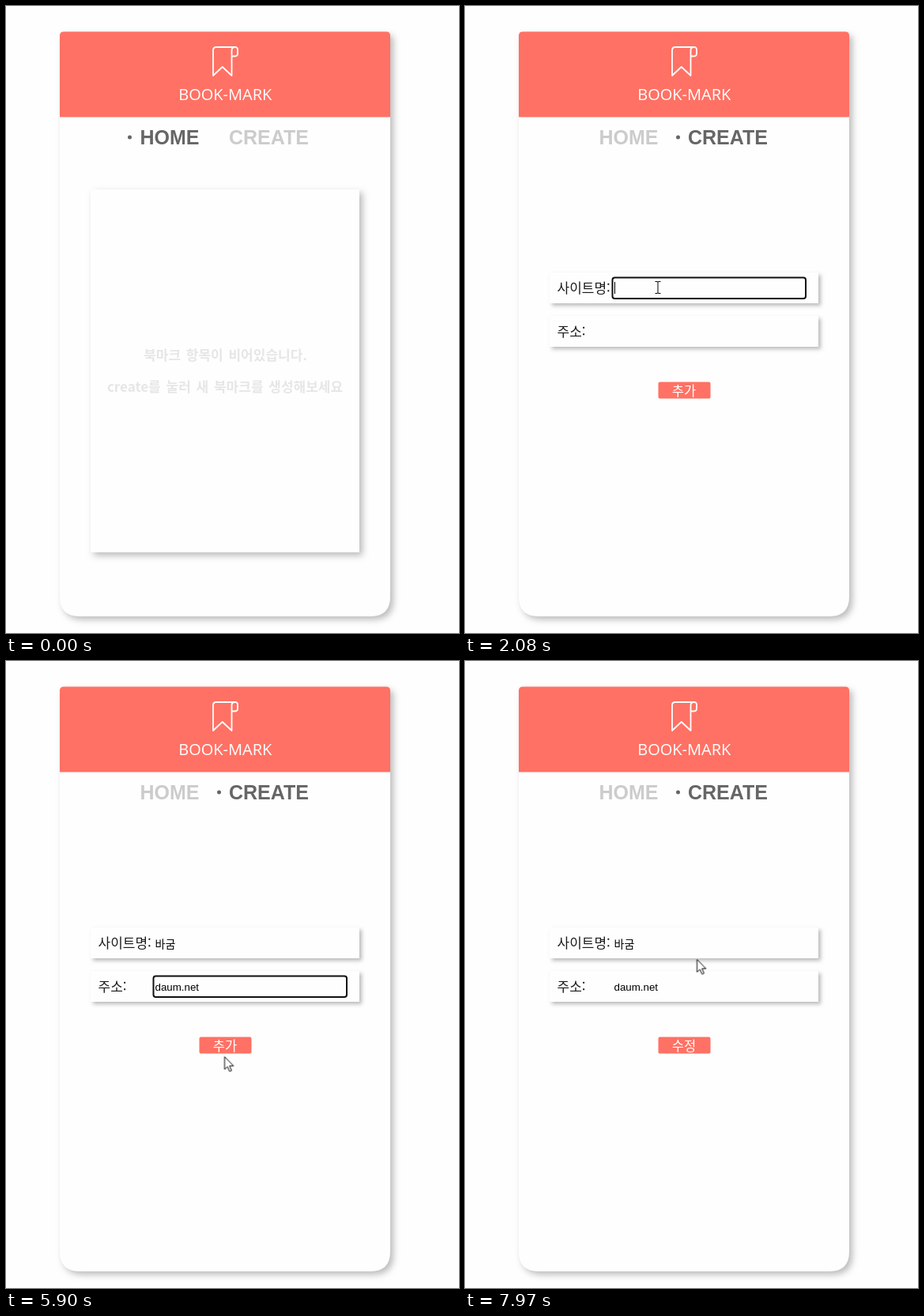
These frames come from a looping animation (573x793 px, 8000 ms). An HTML page:

```html
<!DOCTYPE html>
<html lang="ko">
<head>
<meta charset="utf-8">
<title>Bookmark app</title>
<style>
  html, body { margin: 0; width: 573px; height: 793px; overflow: hidden; background: #fefefe; }
  body { position: relative; }
  svg { position: absolute; left: 0; top: 0; }
  text, .typed { font: 17px "Noto Sans CJK KR", "Noto Sans KR", "Noto Sans CJK", sans-serif; }

  .mid { text-anchor: middle; }
  .panel { fill: #fefefe; filter: drop-shadow(4px 4px 4px #0004); }
  .row { fill: #fefefe; filter: drop-shadow(3px 3px 2.5px #0004); }
  .coral { fill: #ff7164; }
  .ring { fill: #fefefe; stroke: #101010; stroke-width: 2; }
  .brand { font: 20px "Open Sans", sans-serif; fill: #fff; }
  .tab { font: bold 25px "Liberation Sans", Arial, sans-serif; }
  .hint { font-weight: bold; fill: #e6e6e6; word-spacing: 2px; }
  .label { fill: #1c1c1c; }
  .value { font-size: 14px; }
  .action { font-size: 16.5px; fill: #fff; }
  .title { font-size: 19px; font-weight: bold; fill: #444; }
  .link { font: 11.4px "Open Sans", sans-serif; fill: #5b9bef; }
  .edit { font: 11px "Open Sans", sans-serif; fill: #fff; }
  .delete { font: bold 10.7px "Liberation Sans", Arial, sans-serif; fill: #fff; }

  .typed {
    position: absolute; left: 188.5px; height: 15px; line-height: 15px;
    white-space: pre; color: #000; border-right: 1px solid transparent;
  }
  #name { top: 349px; font-size: 14px; }
  #name::after { text-decoration: underline; }
  #address {
    top: 405px; overflow: hidden;
    font: 13.333px/15px "Liberation Sans", Arial, sans-serif;
  }

  /* One 8 s clock; every part holds its state until the next key. */
  .k, #name::before, #name::after { animation: 8s step-end infinite; }
  #home { animation-name: home; }
  #create { animation-name: create; }
  #dot { animation-name: dot; }
  #empty { animation-name: empty; }
  #form { animation-name: form; }
  #item { animation-name: item; }
  #ring1 { animation-name: ring1; }
  #ring2 { animation-name: ring2; }
  #saved { animation-name: saved; }
  #add { animation-name: add; }
  #update { animation-name: update; }
  #name { animation-name: name-caret; }
  #name::before { content: ""; animation-name: committed; }
  #name::after { content: ""; animation-name: composing; }
  #address { animation-name: address; }
  #cursor { animation-name: move; }
  #arrow { animation-name: arrow; }
  #hand { animation-name: hand; }
  #beam { animation-name: beam; }

  @keyframes home { 0%, 78.5% { fill: #666 } 15.125%, 92.875% { fill: #ccc } }
  @keyframes create { 0%, 78.5% { fill: #ccc } 15.125%, 92.875% { fill: #666 } }
  @keyframes dot {
    0%, 78.5% { transform: none }
    15.125%, 92.875% { transform: translateX(113px) }
  }
  @keyframes empty { 0% { opacity: 1 } 15.125% { opacity: 0 } }
  @keyframes form { 0%, 78.5% { opacity: 0 } 15.125%, 92.875% { opacity: 1 } }
  @keyframes item { 0%, 92.875% { opacity: 0 } 78.5% { opacity: 1 } }
  @keyframes ring1 { 0%, 43.375% { opacity: 0 } 26% { opacity: 1 } }
  @keyframes ring2 { 0%, 76.5% { opacity: 0 } 43.375% { opacity: 1 } }
  @keyframes saved { 0% { opacity: 0 } 43.375% { opacity: 1 } }
  @keyframes add { 0% { opacity: 1 } 78.5% { opacity: 0 } }
  @keyframes update { 0% { opacity: 0 } 78.5% { opacity: 1 } }

  @keyframes name-caret {
    0%, 31.75%, 43.375% { border-color: transparent }
    26%, 35.75% { border-color: #000 }
  }
  @keyframes committed { 0%, 43.375% { content: "" } 40.5% { content: "바" } }
  @keyframes composing {
    0%, 43.375% { content: "" }
    35.75% { content: "ㅂ" }
    37.625% { content: "바" }
    38.625% { content: "박" }
    40.5% { content: "구" }
  }
  @keyframes address {
    0%, 50.25%, 78.5% { width: 0; border-color: transparent }
    43.375% { width: 0; border-color: #000 }
    51.25% { width: .556em; border-color: #000 }
    52.125% { width: 1.112em; border-color: #000 }
    53.125% { width: 1.668em; border-color: #000 }
    56% { width: 2.501em; border-color: #000 }
    57.875% { width: 2.779em; border-color: #000 }
    61% { width: 3.335em; border-color: #000 }
    61.875% { width: 3.891em; border-color: #000 }
    63.75% { width: 4.2em; border-color: #000 }
    69.75%, 92.875% { width: 4.2em; border-color: transparent }
  }

  @keyframes move {
    0% { transform: translate(469px, 622px) }
    .875% { transform: translate(469px, 622px); animation-timing-function: steps(5) }
    5.525% { transform: translate(290px, 290px); animation-timing-function: steps(2) }
    7.3875% { transform: translate(250px, 137px); animation-timing-function: steps(2) }
    9.25% { transform: translate(323px, 150px) }
    12.125% { transform: translate(327px, 157px) }
    13.125% { transform: translate(331px, 163px) }
    20.125% { transform: translate(331px, 163px); animation-timing-function: steps(6, jump-both) }
    26% { transform: translate(244px, 356px) }
    71.625% { transform: translate(252px, 392px) }
    72.625% { transform: translate(264px, 450px) }
    73.75% { transform: translate(276.5px, 500.5px) }
    74.75% { transform: translate(284px, 508px) }
    75.625% { transform: translate(288px, 498px) }
    76.5% { transform: translate(286px, 482px) }
    78.5% { transform: translate(286px, 482px); animation-timing-function: steps(5) }
    83.375% { transform: translate(406px, 238px) }
    85.25% { transform: translate(414px, 245px) }
    92.875% { transform: translate(414px, 245px); animation-timing-function: steps(7) }
    99.625% { transform: translate(293.5px, 377.5px) }
  }
  @keyframes arrow {
    0%, 9.25%, 26%, 76.5%, 85.25% { opacity: 0 }
    .875%, 20.125%, 71.625%, 79.475%, 93.8% { opacity: 1 }
  }
  @keyframes hand {
    0%, 20.125%, 79.475%, 93.8% { opacity: 0 }
    9.25%, 76.5%, 85.25% { opacity: 1 }
  }
  @keyframes beam { 0%, 71.625% { opacity: 0 } 26% { opacity: 1 } }
</style>
</head>
<body>
<svg width="573" height="793" viewBox="0 0 573 793">
  <path class="panel" d="M68 38q0-5 5-5H481q5 0 5 5V747q0 25-25 25H93q-25 0-25-25z"/>
  <path class="coral" d="M68 140.5V37.500q0-5 5-5H481q5 0 5 5V140.500z"/>
  <path fill="none" stroke="#fff" stroke-width="1.8" stroke-linejoin="round"
    d="M289.500 52H266q-4 0-4 4V88L273.700 77 285.500 88V56q0-4 4-4t3.500 4V60q0 3.500-3 3.500H285.500"/>
  <text class="brand mid" x="277.300" y="119">BOOK-MARK</text>

  <text id="home" class="tab k" x="169.500" y="175">HOME</text>
  <text id="create" class="tab k" x="282" y="175">CREATE</text>
  <circle id="dot" class="k" cx="156.500" cy="166" r="2.500" fill="#666"/>

  <g id="empty" class="k">
    <rect class="panel" x="107" y="232" width="340" height="459"/>
    <text class="hint mid" x="277.500" y="448">북마크 항목이 비어있습니다.</text>
    <text class="hint mid" x="277" y="488">create를 눌러 새 북마크를 생성해보세요</text>
  </g>

  <g id="form" class="k">
    <rect class="row" x="107" y="337" width="340" height="39"/>
    <rect class="row" x="107" y="392" width="340" height="39"/>
    <rect id="ring1" class="ring k" x="186.500" y="343.500" width="244.500" height="26.500" rx="3"/>
    <rect id="ring2" class="ring k" x="186.500" y="398.500" width="244.500" height="26.500" rx="3"/>
    <text class="label" x="116.500" y="363">사이트명:</text>
    <text class="label" x="116.500" y="418">주소:</text>
    <text id="saved" class="value k" x="188.500" y="362.500">바굼</text>
    <rect class="coral" x="244.500" y="475.500" width="66" height="21" rx="2"/>
    <text id="add" class="action mid k" x="277" y="492.500">추가</text>
    <text id="update" class="action mid k" x="277" y="492.500">수정</text>
  </g>

  <g id="item" class="k">
    <rect class="row" x="99" y="232" width="357" height="89"/>
    <text class="title" x="108" y="268.500">바굼</text>
    <rect x="108" y="279.500" width="30" height="2" fill="#7d8894"/>
    <text class="link" x="108" y="305">daum.net</text>
    <rect x="399" y="241.500" width="47" height="15.500" rx="2" fill="#b5b5b5"/>
    <text class="edit mid" x="422.500" y="254">edit</text>
    <rect x="402" y="269.500" width="41" height="14" rx="2" fill="#ff918a"/>
    <text class="delete mid" x="422.500" y="280.500">delete</text>
  </g>
</svg>

<span id="name" class="typed k"></span>
<span id="address" class="typed k">daum.net</span>

<svg width="573" height="793" viewBox="0 0 573 793">
  <g id="cursor" class="k" fill="#fff" stroke="#000">
    <path id="arrow" class="k" d="M0 0V16l3.700-3.400 2.600 6 2.600-1.100-2.600-5.900H11.300z"/>
    <path id="hand" class="k" d="M-1.600 15V1.600a1.600 1.600 0 0 1 3.200 0V7.500a1.600 1.600 0 0 1 3.200 0V8.500a1.600 1.600 0 0 1 3.200 0V9.500a1.500 1.500 0 0 1 3 0V15c0 5-2 8-6 8.500-4.500.3-6-1.500-7.500-4l-3.600-6c-1-2 1-3 2.300-1.500zM1.600 7v5M4.800 8v4.500M8 9v4"/>
    <path id="beam" class="k" fill="none" d="M-3.500-7.500h2.500q1 0 1 1V6.500q0 1-1 1h-2.500M3.500-7.500h-2.500q-1 0-1 1M0 6.500q0 1 1 1h2.500"/>
  </g>
</svg>
</body>
</html>
```
